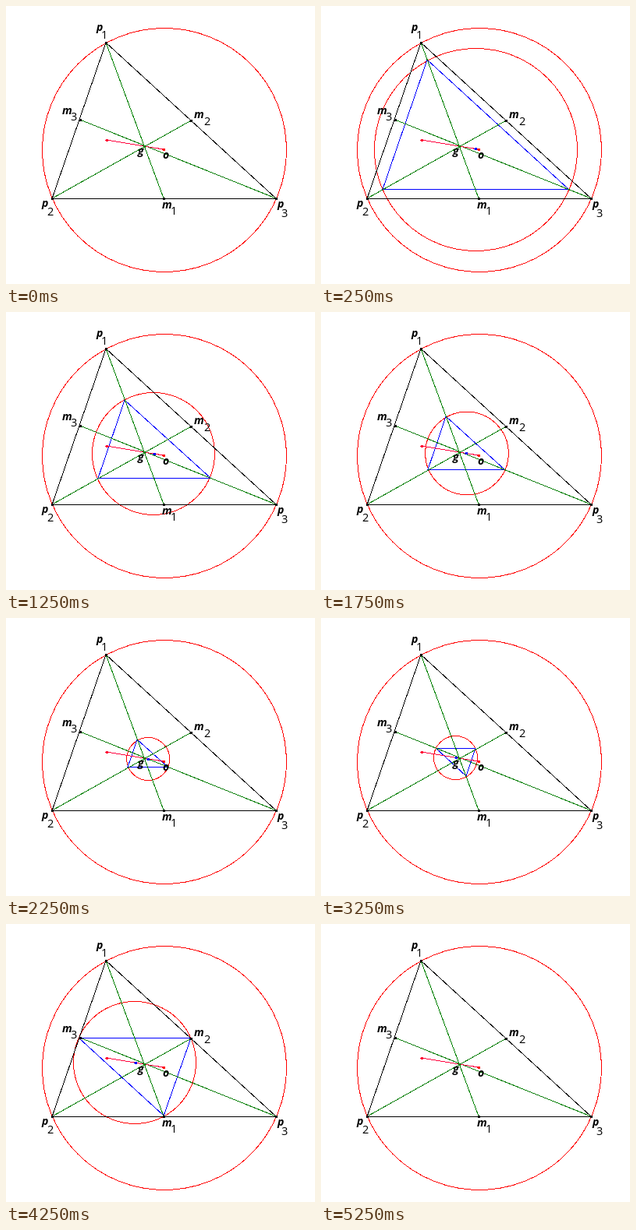
An HTML page for the animation above (6 s loop, 396 by 357 pixels).

```html
<!DOCTYPE html>
<html lang="en">
<head>
<meta charset="utf-8">
<title>Nine-point circle</title>
<style>
  html, body { margin: 0; width: 100%; height: 100%; overflow: hidden; background: #fff; }
  svg { display: block; }
  .shapes { fill: none; stroke-width: 1; shape-rendering: crispEdges; }
  .dots { shape-rendering: crispEdges; }
  text { font: italic 700 14px "Open Sans", "Noto Sans", sans-serif; }
  .index { font: 400 14.5px "Open Sans", "Noto Sans", sans-serif; }
</style>
</head>
<body>
<svg width="396" height="357" viewBox="0 0 396 357">
  <g class="shapes" transform="translate(.5 .5)" id="rings"></g>
  <g class="shapes" transform="translate(.1 .1)" id="lines"></g>
  <g class="dots" transform="translate(.5 .5)" id="dots"></g>
  <g id="labels"></g>
</svg>
<script>
const LOOP = 6000;
const OUTER_RADIUS = 156.5;
const corners = [[128, 47], [59, 247], [346, 247]];
const middles = [[202, 247], [237, 147], [95, 146]];
const centroid = [177.7, 179.8];
const circumcenter = [202, 184];
const orthocenter = [129, 172];

// Start time, then the signed radius and the centre of the inner circle.
const steps = [
  { at: 0 },
  { at: 250, r: 130, center: [198, 184] },
  { at: 750, r: 104, center: [193, 183] },
  { at: 1250, r: 78.5, center: [188.5, 181.5] },
  { at: 1750, r: 53.3, center: [186.5, 181] },
  { at: 2250, r: 27.5, center: [181.7, 180.5] },
  { at: 2750, r: 0, center: centroid },
  { at: 3250, r: -28, center: [172, 179] },
  { at: 3750, r: -53, center: [169, 177] },
  { at: 4250, r: -78.5, center: [164.5, 177.5] },
  { at: 5250 }
];

function add(parent, tag, attrs, text = "") {
  const node = document.createElementNS("http://www.w3.org/2000/svg", tag);
  for (const key in attrs) node.setAttribute(key, attrs[key]);
  node.textContent = text;
  return parent.appendChild(node);
}

const [rings, lines, dots, labels] =
  ["rings", "lines", "dots", "labels"].map(id => document.getElementById(id));
const ring = ([cx, cy], r) => add(rings, "circle", { cx, cy, r, stroke: "#f00" });
const polygon = (points, stroke) => add(lines, "polygon", { points: points.join(" "), stroke });
const line = ([x1, y1], [x2, y2], stroke) => add(lines, "line", { x1, y1, x2, y2, stroke });
const dot = ([cx, cy], fill, r = 2) => add(dots, "circle", { cx, cy, r, fill });

function label(letter, x, y, index, ix, iy) {
  add(labels, "text", { x, y }, letter);
  if (index) add(labels, "text", { x: ix, y: iy, class: "index" }, index);
}

ring([202.5, 184.5], OUTER_RADIUS);
polygon(corners, "#000");
const innerRing = ring(centroid, 0);
const innerTriangle = polygon(corners, "#00f");
corners.forEach((corner, i) => line(corner, middles[i], "#008000"));
line(orthocenter, circumcenter, "#ff0040");

corners.forEach(p => dot(p, "#000", 1.5));
middles.forEach(p => dot(p, "#000"));
dot([177, 180], "#008000", 1.5);
dot(orthocenter, "#ff0033");
dot(circumcenter, "#f00");
const innerDot = dot(centroid, "#00f");

label("p", 116, 32, "1", 122, 42);
label("p", 46, 258, "2", 53, 269);
label("p", 348, 259, "3", 353, 271);
label("m", 200, 260, "1", 211, 268);
label("m", 241, 144, "2", 254, 153);
label("m", 72, 139, "3", 83, 147);
label("g", 169, 191);
label("o", 201, 196);

function draw(time) {
  const { r, center } = steps.findLast(step => step.at <= time);
  const visible = center ? "visible" : "hidden";
  for (const node of [innerRing, innerTriangle, innerDot]) node.setAttribute("visibility", visible);
  if (!center) return;

  const scale = r / OUTER_RADIUS;
  const shrink = p => p.map((v, i) => centroid[i] + scale * (v - centroid[i]));
  const [x, y] = center;
  innerRing.setAttribute("cx", x);
  innerRing.setAttribute("cy", y);
  innerRing.setAttribute("r", Math.abs(r));
  innerTriangle.setAttribute("points", corners.map(p => shrink(p).map(Math.floor)).join(" "));
  const [dotX, dotY] = shrink(circumcenter).map(Math.round);
  innerDot.setAttribute("cx", dotX);
  innerDot.setAttribute("cy", dotY);
}

function tick() {
  draw(performance.now() % LOOP);
  requestAnimationFrame(tick);
}
tick();
</script>
</body>
</html>
```
